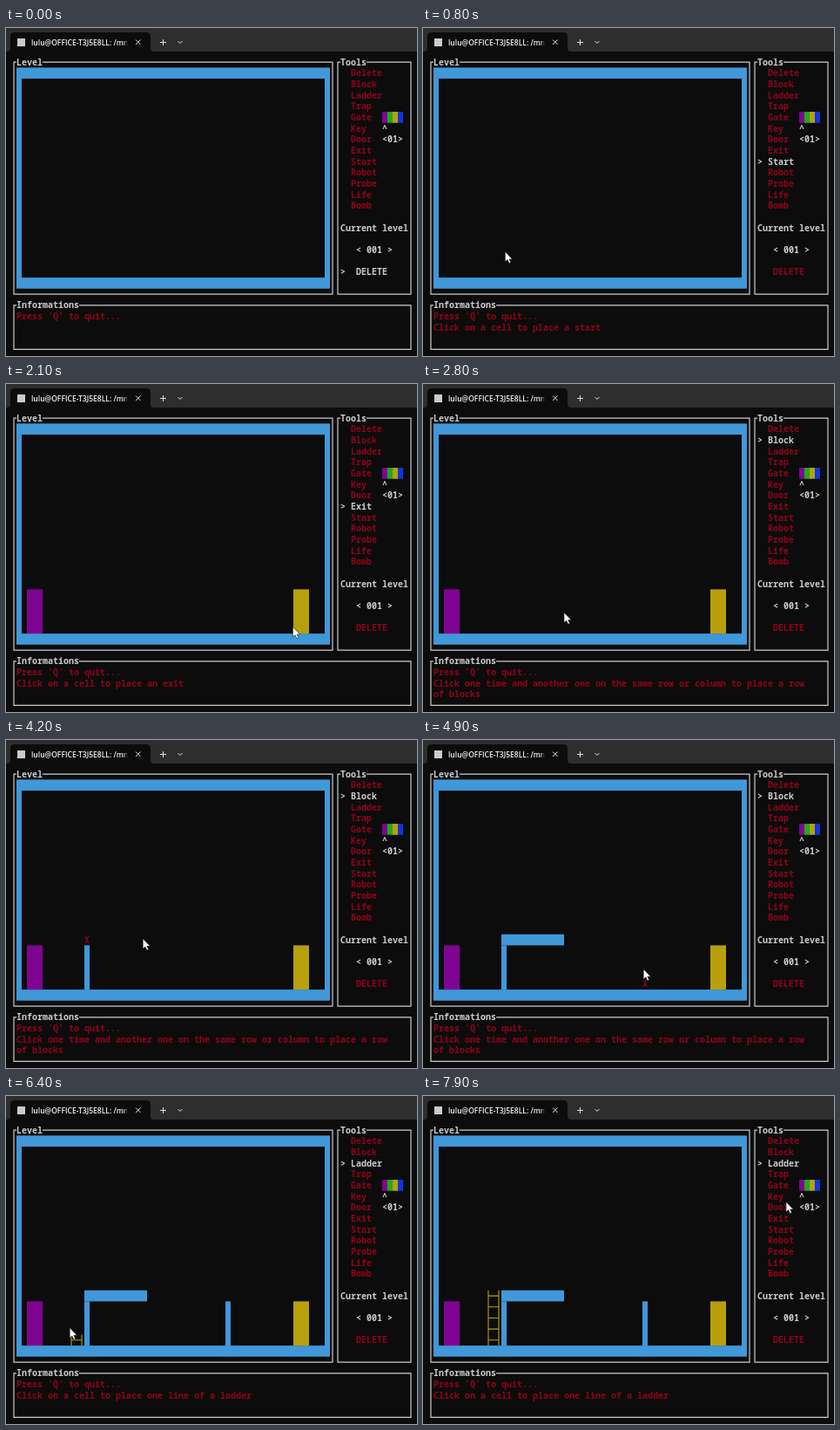
An HTML page that plays this animation: 472x376 px, repeating every 8 s.

```html
<!DOCTYPE html>
<html lang="en">
<head>
<meta charset="utf-8">
<title>Level editor</title>
<style>
  html, body { margin: 0; width: 100%; height: 100%; overflow: hidden; background: #0c0c0c; }
  svg { display: block; width: 472px; height: 376px; }
  #screen text { font: 600 10px "Noto Sans Mono", "DejaVu Sans Mono", monospace; white-space: pre; }
  .tab { font: 600 8.5px "Open Sans", "Noto Sans", sans-serif; fill: #f2f2f2; }
</style>
</head>
<body>
<svg viewBox="0 0 472 376">
  <defs>
    <linearGradient id="fade" x1="0" x2="1">
      <stop offset="0" stop-color="#0c0c0c" stop-opacity="0"/>
      <stop offset="1" stop-color="#0c0c0c"/>
    </linearGradient>
    <clipPath id="title"><rect x="26" y="6" width="114" height="20"/></clipPath>
  </defs>
  <rect width="472" height="376" fill="#0c0c0c"/>
  <rect width="472" height="27" fill="#2e2e2e"/>
  <path d="M1 27q4 0 4-4V10q0-5 5-5H161q5 0 5 5V23q0 4 4 4Z" fill="#0c0c0c"/>
  <rect x="13" y="12" width="9" height="9" fill="#ccc"/>
  <text class="tab" x="29" y="19.500" clip-path="url(#title)">lulu@OFFICE-T3J5E8LL: /mnt</text>
  <rect x="135" y="8" width="5" height="17" fill="url(#fade)"/>
  <path d="M149 13.500l5.500 5.500m0-5.500l-5.500 5.500M177 16.500h7m-3.500-3.500v7M197.500 15l2.500 2.500 2.500-2.500"
        fill="none" stroke="#e0e0e0"/>
  <g id="screen"></g>
  <path id="cursor" d="M0 0V11.500L2.700 9.200 4.600 13.300 6.500 12.400 4.700 8.500H8.300Z"
        fill="#fff" stroke="#111" stroke-width=".6"/>
</svg>
<script>
const LOOP = 8000, TICK = 100, REST = 150;
const CW = 6, CH = 12.67, TOP = 32.7;
const RED = '#900319', WHITE = '#ccc', BLUE = '#4098d9';
const PURPLE = '#800492', GREEN = '#22a81c', YELLOW = '#b8a00c', NAVY = '#1034dc';

const screen = document.getElementById('screen');
const cursor = document.getElementById('cursor');

function add(tag, attrs, text) {
  const node = document.createElementNS('http://www.w3.org/2000/svg', tag);
  for (const k in attrs) node.setAttribute(k, attrs[k]);
  if (text) node.textContent = text;
  return screen.appendChild(node);
}
const rowTop = row => TOP + row * CH;
const rowMid = row => rowTop(row + .5);
const baseline = row => rowMid(row) + 3.6;
const print = (col, row, text, fill) =>
  add('text', { x: col * CW, y: baseline(row), fill }, text);
const cells = (col, row, w, h, fill) =>
  add('rect', { x: col * CW, y: rowTop(row), width: w * CW, height: h * CH, fill });

function frame(c1, r1, c2, r2, title) {
  const x = c1 * CW + 3, y = rowMid(r1), start = (c1 + 1) * CW;
  add('path', {
    d: `M${start} ${y}H${x}V${rowMid(r2)}H${c2 * CW + 3}V${y}H${start + title.length * CW}`,
    fill: 'none', stroke: WHITE, 'stroke-width': 1.2
  });
  print(c1 + 1, r1, title, WHITE);
}
function rung(col, row) {
  const x = col * CW + 3;
  return add('path', {
    d: `M${x} ${rowTop(row)}v${CH}m12 0v${-CH}M${x} ${rowMid(row)}h12`,
    fill: 'none', stroke: YELLOW, 'stroke-width': 1.1
  });
}

// Fixed layout
frame(1, 0, 62, 21, 'Level');
frame(63, 0, 77, 21, 'Tools');
frame(1, 22, 77, 26, 'Informations');
cells(2, 1, 60, 20, BLUE);
cells(3, 2, 58, 18, '#0c0c0c');
[PURPLE, GREEN, YELLOW, NAVY].forEach((c, i) => cells(72 + i, 5, 1, 1, c));
print(72, 6, '^', WHITE);
print(72, 7, '<01>', WHITE);
print(64, 15, 'Current level', WHITE);
print(67, 17, '< 001 >', WHITE);
print(2, 23, "Press 'Q' to quit...", RED);

const tools = {};
['Delete', 'Block', 'Ladder', 'Trap', 'Gate', 'Key', 'Door', 'Exit', 'Start',
 'Robot', 'Probe', 'Life', 'Bomb'].forEach((name, i) => {
  tools[name] = { row: i + 1, label: print(66, i + 1, name, RED) };
});
tools.DELETE = { row: 19, label: print(67, 19, 'DELETE', RED) };
const marker = print(64, 0, '>', WHITE);
const info = [print(2, 24, '', RED), print(2, 25, '', RED)];

// The session, told as actions in grid cells
const stops = [], items = [], choices = [{ at: 0, tool: 'DELETE', lines: [] }];

const rest = (until, col, row) => stops.push({ at: until, x: col * CW, y: rowTop(row) });
const click = (at, col, row) => rest(at, col + .2, row + .4);
const show = (node, from, to = LOOP) => items.push({ node, from, to });

function pick(at, tool, ...lines) {
  rest(at, 67.3, tools[tool].row + .85);
  choices.push({ at, tool, lines });
}
function door(at, col, fill) {
  click(at, col, 19);
  show(cells(col, 16, 3, 4, fill), at);
}
function blocks(t1, t2, c1, r1, c2, r2) {
  click(t1, c1, r1);
  show(print(c1, r1, 'X', RED), t1, t2);
  click(t2, c2, r2);
  show(cells(c1, r2, c2 - c1 + 1, r1 - r2 + 1, BLUE), t2);
}

rest(200, 73, 6);
pick(400, 'Start', 'Click on a cell to place a start');
door(1100, 4, PURPLE);
rest(1500, 67.5, 11.55);
pick(1600, 'Exit', 'Click on a cell to place an exit');
door(2000, 55, YELLOW);
click(2200, 54.7, 19);
pick(2750, 'Block', 'Click one time and another one on the same row or column to place a row', 'of blocks');
rest(2800, 27, 18.1);
blocks(3200, 3600, 15, 19, 15, 16);
blocks(4000, 4300, 15, 15, 26, 15);
blocks(4700, 5300, 42, 19, 42, 16);
pick(5800, 'Ladder', 'Click on a cell to place one line of a ladder');
rest(6200, 10.8, 20.4);
for (let i = 0; i < 5; i++) {
  const at = 6300 + i * 250, row = 19 - i;
  click(at, 12, row);
  show(rung(12, row), at);
}
rest(7700, 73.5, 5.4);
rest(LOOP, 69.5, 7);

// Leaves each stop at its time and reaches the next one REST ms early
function pointerAt(t) {
  const i = stops.findIndex(s => s.at > t);
  const b = stops[i], a = stops[i - 1] || b;
  const span = Math.max(b.at - a.at - REST, 50);
  const p = Math.min((t - a.at) / span, 1), e = p * p * (3 - 2 * p);
  return [a.x + (b.x - a.x) * e, a.y + (b.y - a.y) * e];
}

function draw(t) {
  const { tool, lines } = choices.filter(c => c.at <= t).pop();
  for (const name in tools) tools[name].label.setAttribute('fill', name === tool ? WHITE : RED);
  marker.setAttribute('y', baseline(tools[tool].row));
  info.forEach((node, i) => { node.textContent = lines[i] || ''; });
  for (const { node, from, to } of items)
    node.style.display = t >= from && t < to ? '' : 'none';
  cursor.style.display = t < TICK ? 'none' : '';
  // The first stop has no predecessor, so it simply holds
  const [x, y] = t < stops[0].at ? [stops[0].x, stops[0].y] : pointerAt(t);
  cursor.setAttribute('transform', `translate(${x} ${y})`);
}

const began = performance.now();
function tick() {
  const t = (performance.now() - began) % LOOP;
  draw(Math.floor(t / TICK) * TICK);
  requestAnimationFrame(tick);
}
tick();
</script>
</body>
</html>
```
